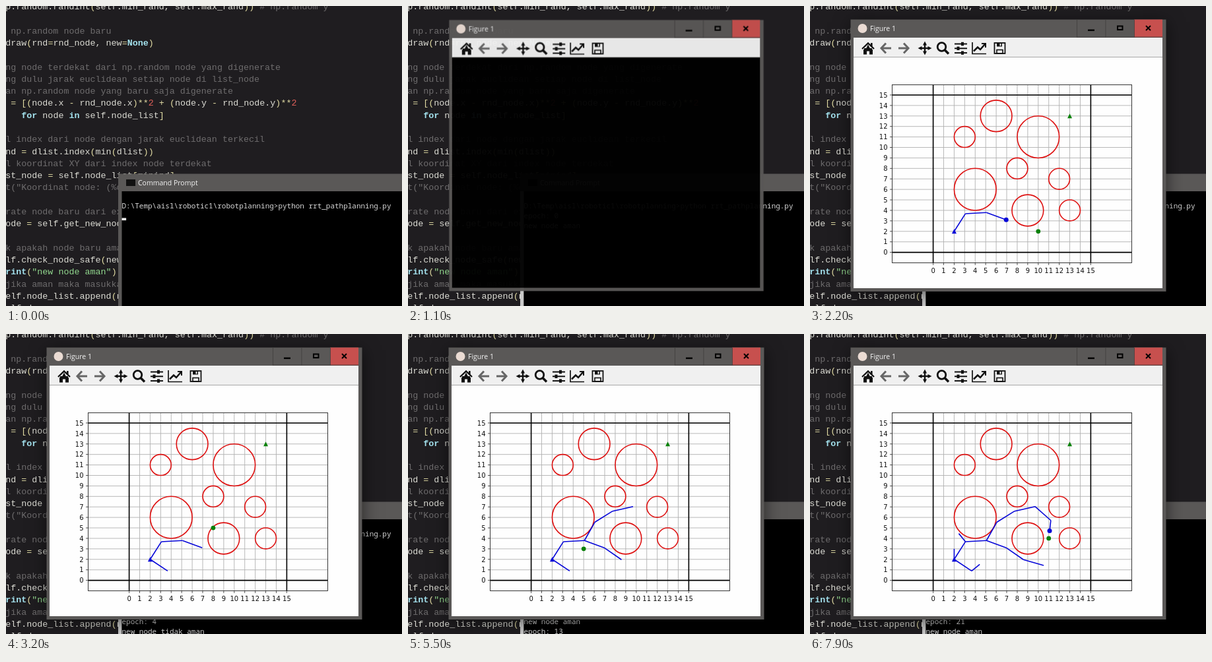
An HTML page with a canvas that plays this animation: 600 by 455 pixels, repeating every 8000 ms.

```html
<!DOCTYPE html>
<html lang="en">
<head>
<meta charset="utf-8">
<title>RRT path planning</title>
<style>
html, body { margin: 0; width: 100%; height: 100%; overflow: hidden; background: #1f1d20; }
canvas { display: block; width: 600px; height: 455px; }
</style>
</head>
<body>
<canvas id="stage" width="600" height="455"></canvas>
<script>
const stage = document.getElementById('stage').getContext('2d');
const layer = document.createElement('canvas');
layer.width = 600;
layer.height = 455;
let ctx = stage;

const LOOP = 8000, STEP = 100, OPEN = 900, SHOWN = 1200;
const MONO = '13.37px "Liberation Mono", monospace';
const TERM = '10.98px "Noto Sans Mono", monospace';
const UI = '10.5px "Open Sans", sans-serif';
const GRAY = '#5a5857', INK = '#111';

// "~" starts a comment
const CODE = `p.random.randint(self.min_rand, self.max_rand)) # np.random y

~ np.random node baru
draw(rnd=rnd_node, new=None)

~ng node terdekat dari np.random node yang digenerate
~ng dulu jarak euclidean setiap node di list_node
~an np.random node yang baru saja digenerate
 = [(node.x - rnd_node.x)**2 + (node.y - rnd_node.y)**2
   for node in self.node_list]

~l index dari node dengan jarak euclidean terkecil
nd = dlist.index(min(dlist))
~l koordinat XY dari index node terdekat
st_node = self.node_list[minind]
~t("Koordinat node: (%d

~rate node baru dari ex
ode = self.get_new_node

~k apakah node baru aman
lf.check_node_safe(new_
rint("new node aman")
~jika aman maka masukkan
elf.node_list.append(new
elf.draw`.split('\n');
const TOKENS = /(~.*|#.*|"[^"]*"?|\b(?:for|in|None|rint)\b|\b\d+|[()[\]=*+-]+)/;

const OBSTACLES = [
  [6, 13, 1.5], [3, 11, 1], [10, 11, 2], [8, 8, 1],
  [12, 7, 1], [4, 6, 2], [9, 4, 1.5], [13, 4, 1]
];
const SAMPLES = ('9,13 9,4 10,2 5,0 8,5 8,9 3,7 10,8 9,5 10,1 2,9 ' +
  '8,12 14,8 5,3 2,5 7,4 5,2 4,5 2,3 12,1 12,5 11,4')
  .split(' ').map(s => s.split(',').map(Number));
const START = { x: 2, y: 2 };

// Grow the tree: step from the nearest node towards each sample
function plan() {
  const nodes = [START];
  return SAMPLES.map(([rx, ry], k) => {
    const gap = n => Math.hypot(rx - n.x, ry - n.y);
    const from = nodes.reduce((a, b) => gap(b) < gap(a) ? b : a);
    const d = gap(from), step = d < 2 ? 1 : 2;
    const x = from.x + (rx - from.x) / d * step;
    const y = from.y + (ry - from.y) / d * step;
    const safe = d >= 1 && OBSTACLES.every(([cx, cy, r]) => Math.hypot(x - cx, y - cy) > r);
    if (safe) nodes.push({ x, y });
    const at = k < 5 ? 1000 + 500 * k : 3260 + 280 * (k - 5);
    return { at, done: at + 100, rx, ry, from, x, y, safe };
  });
}
const EPOCHS = plan();

const px = x => 186.6 + x * 15.92;
const py = y => 373.6 - y * 15.91;

function rect(x, y, w, h, color) {
  ctx.fillStyle = color;
  ctx.fillRect(x, y, w, h);
}

function box(x, y, w, h, color, width) {
  ctx.strokeStyle = color;
  ctx.lineWidth = width;
  ctx.strokeRect(x, y, w, h);
}

function trace(points) {
  ctx.beginPath();
  points.forEach(([x, y]) => ctx.lineTo(x, y));
}

function line(points, color, width) {
  trace(points);
  ctx.strokeStyle = color;
  ctx.lineWidth = width;
  ctx.stroke();
}

// Upright triangle around its centre
function triangle(x, y, r, color) {
  trace([[x, y - r], [x + r, y + r], [x - r, y + r]]);
  ctx.fillStyle = color;
  ctx.fill();
}

function disc(x, y, r, color) {
  ctx.beginPath();
  ctx.arc(x, y, r, 0, Math.PI * 2);
  ctx.fillStyle = color;
  ctx.fill();
}

function ring(x, y, r, color, width) {
  ctx.beginPath();
  ctx.arc(x, y, r, 0, Math.PI * 2);
  ctx.strokeStyle = color;
  ctx.lineWidth = width;
  ctx.stroke();
}

function text(str, x, y, font, color, align = 'left') {
  ctx.font = font;
  ctx.fillStyle = color;
  ctx.textAlign = align;
  ctx.fillText(str, x, y);
}

function at(x, y, paint) {
  ctx.save();
  ctx.translate(x, y);
  paint();
  ctx.restore();
}

function tokenStyle(token) {
  if (/^[~#]/.test(token)) return ['#6e6c6d', ''];
  if (token[0] === '"') return ['#92d88e', ''];
  if (/^\d/.test(token)) return ['#e0605a', ''];
  if (/^(for|in|None|rint)$/.test(token)) return ['#a4e2ee', 'bold '];
  if (/^[()[\]=*+-]/.test(token)) return ['#e2dca4', ''];
  return ['#dcdcd4', ''];
}

function drawCode() {
  rect(0, 0, 600, 455, '#1f1d20');
  CODE.forEach((src, row) => {
    let col = 0;
    for (const token of src.split(TOKENS)) {
      const shown = token.replace('~', '');
      const [color, weight] = tokenStyle(token);
      text(shown, col * 8.023 - 0.8, 5.3 + row * 18.27, weight + MONO, color);
      col += shown.length;
    }
  });
}

function drawTerminal(t) {
  const focused = t < 1000;
  rect(170, 254.5, 430, 201, GRAY);
  rect(170, 281, 5.5, 174, focused ? GRAY : '#c8c8c8');
  rect(175.5, 281, 425, 174, '#000');
  rect(182, 263, 14, 10, INK);
  text('Command Prompt', 200, 272, UI, '#f4f4f4');

  const lines = ['D:\\Temp\\aisl\\robotic1\\robotplanning>python rrt_pathplanning.py'];
  EPOCHS.forEach((e, i) => {
    if (t >= e.at) lines.push('epoch: ' + i);
    if (t >= e.done) lines.push(e.safe ? 'new node aman' : 'new node tidak aman');
  });
  lines.slice(-11).forEach((s, i) => text(s, 175.5, 307.3 + i * 14.75, TERM, '#d6d6d6'));
  if (focused && t % 1000 < 500) rect(175.5, 321.5, 6.6, 3.6, '#f4f4f4');
}

function drawToolbar() {
  rect(66, 48, 468, 29.5, '#f0f0f0');

  // Home
  at(88, 64, () => {
    line([[-9, 1], [0, -7.5], [9, 1]], INK, 2.4);
    triangle(0, -1, 4.5, INK);
    rect(-7, 2, 5, 7.5, INK);
    rect(2, 2, 5, 7.5, INK);
    rect(-6, 0, 12, 4.5, INK);
    rect(4, -8, 2.6, 5, INK);
  });

  // Back and forward
  for (const side of [-1, 1]) at(128.5 + side * 13.5, 64, () => {
    ctx.scale(side, 1);
    line([[-8, 0], [7, 0]], '#666', 3);
    line([[0, -7.5], [7, 0], [0, 7.5]], '#666', 3);
  });

  // Pan
  at(174, 64, () => {
    for (let i = 0; i < 4; i++) {
      line([[0, 0], [0, -8]], INK, 2.4);
      triangle(0, -7.5, 3, INK);
      ctx.rotate(Math.PI / 2);
    }
  });

  // Zoom
  ring(199.5, 62, 6.3, INK, 2.8);
  line([[204, 66.5], [210, 72.5]], INK, 3.5);

  // Sliders
  for (let i = 0; i < 3; i++) {
    const y = 57.5 + i * 6.8;
    line([[219, y], [238, y]], INK, 2);
    rect(i === 1 ? 222.5 : 229, y - 2.7, 4, 5.4, INK);
  }

  // Chart
  at(256, 64, () => {
    line([[-10, -9], [-10, 8.5], [11, 8.5]], INK, 1.7);
    line([[-8, 4.5], [-2, -1.5], [2, 2], [9, -6]], INK, 2.5);
    line([[4, -7], [10, -7], [10, -1]], INK, 2);
  });

  // Save
  at(287.5, 64, () => {
    box(-8, -8, 16, 16, INK, 1.8);
    rect(-4.5, -8, 8, 5.5, INK);
    rect(0, -7, 2, 3.5, '#f0f0f0');
    box(-4.5, 2.5, 9, 5.5, INK, 1.6);
  });
}

function drawFrame(shadow) {
  ctx.save();
  if (shadow) {
    ctx.shadowColor = 'rgba(0,0,0,.55)';
    ctx.shadowBlur = 24;
    ctx.shadowOffsetY = 4;
  }
  rect(61.5, 20.5, 478, 412.5, GRAY);
  ctx.restore();
  disc(79.5, 34, 7, '#eadbd3');
  text('Figure 1', 91, 38, UI, '#f4f4f4');

  rect(491, 20.5, 43, 27, '#c7504e');
  for (let i = 0; i < 3; i++) rect(404 + i * 43.5, 20.5, 0.8, 27, '#403e3e');
  rect(404, 46.7, 130, 0.8, '#403e3e');
  rect(421, 35.5, 10, 2.4, '#000');
  box(466, 30.5, 7.5, 5.5, '#000', 2);
  for (const s of [-1, 1]) line([[512.5 - 3.5 * s, 30], [512.5 + 3.5 * s, 37]], '#000', 1.9);
  drawToolbar();
  rect(66, 77.5, 468, 350.5, '#000');
}

function drawAxes() {
  const L = 124.5, R = 487.5, T = 119.5, B = 389.5;
  const label = '10px "DejaVu Sans", sans-serif';
  rect(66, 77.5, 468, 350.5, '#fefefe');

  for (let i = 0; i <= 15; i++) {
    const x = px(i), y = py(i);
    line([[x, T], [x, B]], '#b0b0b0', 0.9);
    line([[L, y], [R, y]], '#b0b0b0', 0.9);
    line([[x, B], [x, B + 3.5]], '#222', 0.8);
    line([[L, y], [L - 3.5, y]], '#222', 0.8);
    text(i, x, 405, label, INK, 'center');
    text(i, 117.5, y + 3.8, label, INK, 'right');
  }
  for (const v of [0, 15]) {
    line([[px(v), T], [px(v), B]], '#000', 1.6);
    line([[L, py(v)], [R, py(v)]], '#000', 1.6);
  }
  box(L, T, R - L, B - T, '#222', 0.9);
}

function drawTree(t) {
  const blue = '#0606d8', green = '#088008';
  OBSTACLES.forEach(([x, y, r]) => ring(px(x), py(y), r * 15.92, '#de1010', 1.6));

  for (const { safe, done, from, x, y } of EPOCHS) {
    if (safe && t >= done) line([[px(from.x), py(from.y)], [px(x), py(y)]], blue, 1.6);
  }
  triangle(px(START.x), py(START.y), 3.5, blue);
  triangle(px(13), py(13), 3.5, green);

  const now = EPOCHS.filter(e => t >= e.at).pop();
  disc(px(now.rx), py(now.ry), 3.4, green);
  if (now.safe && t >= now.done) disc(px(now.x), py(now.y), 3.5, blue);
}

// The window fades and grows in as one layer
function drawOpening(t) {
  const left = Math.max(0, 1 - (t - OPEN) / 250);
  const ease = 1 - left * left;
  ctx = layer.getContext('2d');
  ctx.clearRect(0, 0, 600, 455);
  drawFrame(false);
  ctx = stage;
  at(300.5, 227, () => {
    ctx.globalAlpha = ease;
    ctx.scale(0.92 + 0.08 * ease, 0.92 + 0.08 * ease);
    ctx.drawImage(layer, -300.5, -227);
  });
}

function draw(t) {
  drawCode();
  drawTerminal(t);
  if (t >= SHOWN) {
    drawFrame(true);
    drawAxes();
    drawTree(t);
  } else if (t > OPEN) {
    drawOpening(t);
  }
}

const began = performance.now();
function tick() {
  const t = (performance.now() - began) % LOOP;
  draw(Math.floor(t / STEP) * STEP);
  requestAnimationFrame(tick);
}
tick();
</script>
</body>
</html>
```
